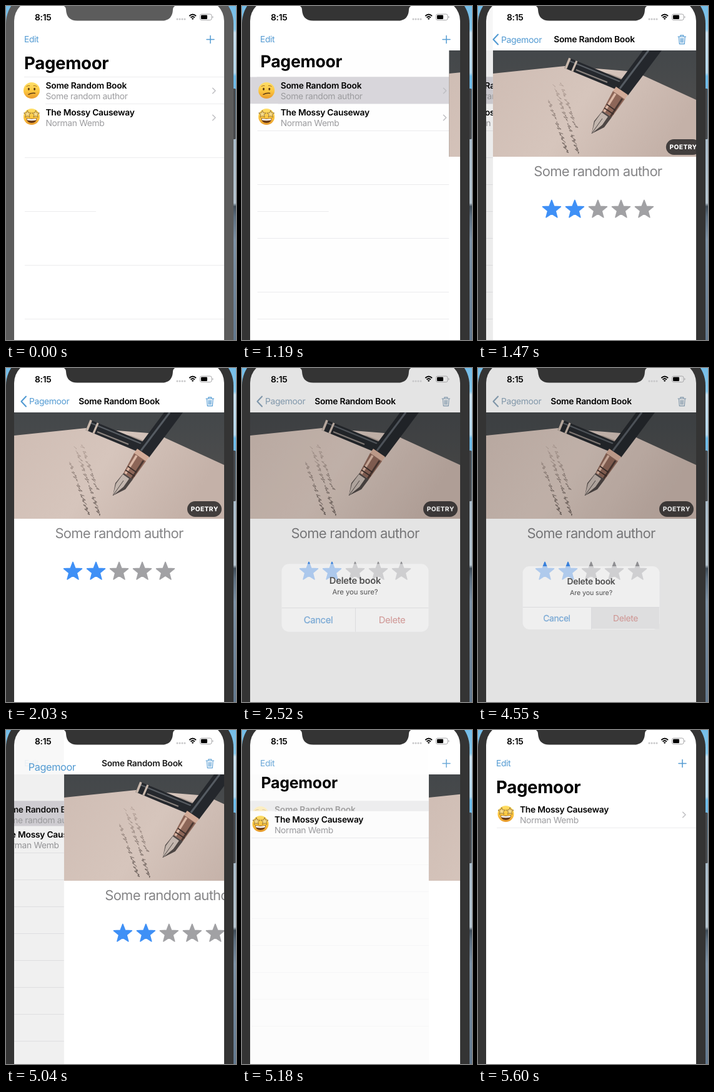
These frames come from a looping animation (368 by 534 pixels, 5810 ms). An HTML page:

```html
<!DOCTYPE html>
<html lang="en">
<head>
<meta charset="utf-8">
<title>Book list</title>
<style>
html, body { margin: 0; width: 100%; height: 100%; overflow: hidden; background: #333; }
svg { display: block; width: 100%; height: 100%; font-family: Inter, "Noto Sans", sans-serif; text-rendering: geometricPrecision; }
.body { font-size: 13.8px; letter-spacing: -.33px; }
.head { font-size: 13.8px; font-weight: 600; letter-spacing: -.24px; }
.large { font-size: 27.6px; font-weight: 700; letter-spacing: -.3px; }
.author { font-size: 22px; letter-spacing: -.74px; fill: #858587; }
.small { font-size: 10.6px; letter-spacing: -.05px; }
.badge { font-size: 10.2px; font-weight: 800; letter-spacing: .4px; fill: #fff; }
.mid { text-anchor: middle; }
.grey { fill: #9c9c9f; }
.blue { fill: #529ad2; }
.line { fill: #ececee; }
.stroke { fill: none; stroke-linecap: round; stroke-linejoin: round; }
</style>
</head>
<body>
<svg id="stage" viewBox="0 0 368 534" preserveAspectRatio="none"></svg>
<script>
const LOOP = 5810, STEP = 70, WIDTH = 336;
const ACTIVE = 980, TAP = 1050, PUSH = 1169, ALERT = 2397, PRESS = 4200, CLOSE = 4480, POP = 4987;
const APP = 'Pagemoor', BOOK = 'Some Random Book', WRITER = 'Some random author';

const text = (x, y, cls, str, extra = '') => `<text x="${x}" y="${y}" class="${cls}" ${extra}>${str}</text>`;
const rect = (x, y, w, h, extra = '') => `<rect x="${x}" y="${y}" width="${w}" height="${h}" ${extra}/>`;
const path = (d, extra = '') => `<path d="${d}" ${extra}/>`;
const group = (id, inner, extra = '') => `<g id="${id}" ${extra}>${inner}</g>`;

function star(cx, cy, r, extra) {
  const pts = Array.from({ length: 10 }, (_, i) => {
    const a = (i * 36 - 90) * Math.PI / 180, k = i % 2 ? r * .43 : r;
    return (cx + k * Math.cos(a)).toFixed(2) + ',' + (cy + k * Math.sin(a)).toFixed(2);
  });
  return `<polygon points="${pts.join(' ')}" stroke-linejoin="round" ${extra}/>`;
}

// A line of loose handwriting running upwards
function scribble(x, y, length, seed) {
  let d = `M${x} ${y}`;
  for (let s = 1; s < length; s += 1.1) {
    const gap = Math.sin(s * .33 + seed) > .8;
    const w = 2.4 * Math.sin(s * 1.7 + seed) + 1.8 * Math.sin(s * .8 + seed * 3);
    d += `${gap ? 'M' : 'L'}${(x - s * .33 + w).toFixed(1)} ${(y - s * .94 + w * .6).toFixed(1)}`;
  }
  return path(d, 'class="stroke" stroke="url(#ink)" stroke-width=".8"');
}

const face = (cy, features) =>
  `<circle cx="41" cy="${cy}" r="13" fill="url(#skin)"/><g transform="translate(41 ${cy})">${features}</g>`;

const confused = face(135, `
  <ellipse cx="-4.6" cy="-2.2" rx="1.5" ry="2.1" fill="#5b3a12"/>
  <ellipse cx="4.6" cy="-2.2" rx="1.5" ry="2.1" fill="#5b3a12"/>` +
  path('M-5 6.3Q0 3.6 5.4 4.4', 'class="stroke" stroke="#5b3a12" stroke-width="1.5"') +
  path('M-8 -6.5Q-5.5 -8.3 -3.2 -7.6M3.2 -7.6Q5.5 -8.3 8 -6.5', 'class="stroke" stroke="#a8701c" stroke-width="1"'));

const starry = face(177,
  path('M-8.4 2.2Q0 4 8.4 2.2Q7.6 10 0 10Q-7.6 10 -8.4 2.2Z', 'fill="#6a3b16"') +
  path('M-7.6 3Q0 4.6 7.6 3L7 5.6Q0 7 -7 5.6Z', 'fill="#fff"') +
  star(-6.6, -4, 6.2, 'fill="#f7dc8c" stroke="#8a6420" stroke-width=".8"') +
  star(6.6, -4, 6.2, 'fill="#f7dc8c" stroke="#8a6420" stroke-width=".8"'));

const chevron = y => path(`M330.7 ${y - 4.2}l4.3 4.2l-4.3 4.2`, 'class="stroke" stroke="#c0c0c4" stroke-width="1.6"');

const row = (id, y, bg, emoji, title, writer) => group(id,
  rect(-90, y, 560, 43, bg) +
  `<g class="lead">${emoji}${text(63.5, y + 18.6, 'head', title)}${text(63.5, y + 35, 'body grey', writer)}</g>` +
  `<g class="tail">${chevron(y + 22)}</g>`);

const lines = Array.from({ length: 8 }, (_, i) =>
  rect(30, 199 + 43 * i, 420, 1, `class="line rule"`)).join('');

const list = group('list',
  rect(-90, 71, 560, 470, 'fill="#fff"') +
  group('topLine', rect(29, 113, 420, 1, 'class="line"')) +
  row('first', 113.5, 'id="tapped" fill="#d9d7dc"', confused, BOOK, WRITER) +
  group('rest',
    row('second', 156.5, 'fill="#fff"', starry, 'The Mossy Causeway', 'Norman Wemb') +
    rect(63, 156, 380, 1, 'id="midLine" class="line"') + lines));

const cap =
  path('M131 91L223 129', 'stroke="#25282d" stroke-width="18"') +
  path('M136 88L224 124', 'stroke="#585d63" stroke-width="2"') +
  path('M131 91L134.5 92.4M142 95.5L145 96.8', 'stroke="#c9b9ad" stroke-width="18"') +
  path('M146 102L196 122', 'stroke="#8d8580" stroke-width="2"');

const pen =
  path('M253 71H283L229 143L209 130Z', 'fill="#24272c"') +
  path('M262 71L216 132', 'stroke="#555b62" stroke-width="3"') +
  path('M210 129L229 142L224 149L205 136Z', 'fill="#d2ab98"') +
  path('M205 136L224 149L203 178L188 168Z', 'fill="#8d6658"') +
  path('M209 140L191 169', 'stroke="#dcb8a6" stroke-width="3.5"') +
  path('M220 148L201 177', 'stroke="#4b3832" stroke-width="3"') +
  path('M195 157L209 167M191 163L206 173', 'stroke="#3a2d2a" stroke-width="1.6"') +
  path('M188 168L203 178L191 194L171 204L175 184Z', 'fill="#4d4644"') +
  path('M187 170L197 177L188 190L171 204L176 185Z', 'fill="#c3b6ae"') +
  path('M171 204L188 180', 'stroke="#4d4644" stroke-width="1"');

const photo = `<g clip-path="url(#frame)">` +
  rect(13, 71, 336, 170, 'fill="url(#table)"') +
  path('M13 108L128 96L240 105L349 155V241H13Z', 'fill="url(#paper)"') +
  path('M136 101L222 139L236 122L200 108Z', 'fill="#5b4d48" opacity=".3"') +
  scribble(133, 237, 92, 1) + scribble(150, 236, 116, 2.4) + scribble(146, 194, 76, 4) +
  cap + pen + '</g>';

const detail = group('detail',
  rect(13, 71, 336, 470, 'fill="#fff"') + photo +
  rect(290, 213, 55, 25, 'rx="12.5" fill="#383635" opacity=".93"') +
  text(317.7, 228.8, 'badge mid', 'POETRY') +
  text(181, 271.6, 'author mid', WRITER) +
  [0, 1, 2, 3, 4].map(i => star(107 + 37 * i, 325.6, 15.2, i < 2
    ? 'fill="#3f90f6" stroke="#3f90f6" stroke-width="1.6"'
    : 'fill="#a1a1a4" stroke="#a1a1a4" stroke-width="1.6"')).join(''));

const nav =
  rect(13, -10, 336, 81, 'fill="#fff"') +
  rect(13, -10, 336, 81, 'id="navShade"') +
  group('edit', text(29, 58.2, 'body blue', 'Edit')) +
  group('plus', path('M321 53.5H333M327 47.5V59.5', 'class="stroke" stroke="#529ad2" stroke-width="1.5"')) +
  group('arrow', path('M32 45.5L24.5 53.5L32 61.5', 'class="stroke tint" stroke-width="2.1"')) +
  group('title', text(181, 58.2, 'head mid', BOOK)) +
  group('trash', path('M320 49H332.6M323.8 49V46.8H328.8V49M321.4 49L322.3 60.6H330.3L331.2 49M324.3 51.6L324.5 58.2M326.3 51.6V58.2M328.3 51.6L328.1 58.2',
    'class="stroke tint" stroke-width="1.15"'));

const morph =
  group('back', text(0, 0, 'body', APP)) + group('large', text(0, 0, 'large', APP));

const alertBox = group('alert',
  rect(71.5, 317, 219, 101, 'rx="11" fill="#f6f6f7" fill-opacity=".96"') +
  rect(182, 383, 108, 34, 'id="press" fill="#dcdcde"') +
  text(181, 346.3, 'head mid', 'Delete book') +
  text(181, 362.6, 'small mid', 'Are you sure?') +
  rect(71.5, 382, 219, 1, 'fill="#d8d8da"') + rect(181, 382, 1, 36, 'fill="#d8d8da"') +
  text(126, 405.2, 'body mid', 'Cancel', 'fill="#3f88cc" stroke="#3f88cc" stroke-width=".25"') +
  text(236, 405.2, 'body mid', 'Delete', 'fill="#c46a66"'));

const status =
  text(46, 22.6, 'head', '8:15') +
  [0, 1, 2, 3].map(i => `<circle cx="${274 + 4 * i}" cy="21" r="1.5" fill="#c6c6c8"/>`).join('') +
  path('M293.3 16Q298.7 11.2 304.1 16M295.5 18.4Q298.7 15.7 301.9 18.4', 'class="stroke" stroke="#000" stroke-width="1.9" style="stroke-linecap:butt"') +
  path('M296.8 19.9Q298.7 18.4 300.6 19.9L298.7 22Z') +
  rect(310.5, 13, 18.5, 9.6, 'rx="2.6" fill="none" stroke="#a5a5a7"') +
  rect(312, 14.5, 10, 6.6, 'rx="1.3"') +
  path('M330.3 16V19.6Q331.6 19 331.6 17.8Q331.6 16.6 330.3 16Z', 'fill="#a5a5a7"');

const fade = (id, stops, extra = 'x2="0" y2="1"') =>
  `<linearGradient id="${id}" ${extra}>` + stops.map(([o, c]) => `<stop offset="${o}" stop-color="${c}"/>`).join('') + '</linearGradient>';

const $ = id => document.getElementById(id);
$('stage').innerHTML = `<defs>` +
  fade('skin', [[0, '#ffe06a'], [.55, '#fcc63f'], [1, '#e99a2c']]) +
  fade('table', [[0, '#43474a'], [1, '#55524f']]) +
  fade('paper', [[0, '#cfbdb4'], [.5, '#d6c5bc'], [1, '#c4b1a8']], 'x2="1" y2=".3"') +
  fade('ink', [[0, '#b5a299'], [.5, '#85756e'], [1, '#4a403c']], 'gradientUnits="userSpaceOnUse" x1="0" x2="0" y1="120" y2="225"') +
  fade('sky', [[0, '#74bde8'], [.07, '#86c8ec'], [.08, '#c9e0ee'], [.2, '#b4d7ec'], [.21, '#6cbdec'], [.25, '#70b8e4'],
    [.4, '#a9bccb'], [.59, '#b4c3ce'], [.6, '#3f4c58'], [.63, '#5d6f80'], [.7, '#7d92a6'], [1, '#62788e']]) +
  `<clipPath id="screen">${rect(13, -10, 336, 640, 'rx="34"')}</clipPath>
  <clipPath id="frame">${rect(13, 71, 336, 170)}</clipPath></defs>` +
  rect(0, 0, 368, 534, 'fill="url(#sky)"') +
  rect(360, 132, 7.5, 81, 'rx="1.5" fill="#45474a"') +
  rect(0, -24, 364, 640, 'rx="52" class="bezel"') +
  `<g clip-path="url(#screen)">` + list + rect(13, 71, 336, 470, 'id="shade"') + detail + nav + morph +
  rect(13, -10, 336, 560, 'id="dim"') + alertBox +
  group('status', status) +
  path('M86 -2Q96 -1 96 6Q97 23.6 114 23.6H249Q266 23.6 267 6Q267 -1 277 -2Z', 'class="bezel"') + '</g>';

const all = sel => [...document.querySelectorAll(sel)];
const bezels = all('.bezel'), tints = all('.tint'), rules = all('.rule'), leads = all('.lead'), tails = all('.tail');
const clamp = v => Math.max(0, Math.min(1, v));
const mix = (a, b, k) => a + (b - a) * k;
const move = (el, x, y = 0, s = 1) => el.setAttribute('transform', `translate(${x} ${y}) scale(${s})`);
const show = (id, v) => $(id).setAttribute('opacity', v);

// Critically damped spring, settled once it is close enough
function spring(ms) {
  if (ms <= 0) return 0;
  const x = ms * .0175, p = 1 - (1 + x) * Math.exp(-x);
  return p > .996 ? 1 : p;
}
const smooth = v => { v = clamp(v); return v * v * (3 - 2 * v); };

function draw(t) {
  const open = t < POP ? spring(t - PUSH) : 1 - spring(t - POP);
  const gone = smooth((t - POP) / 330);
  const pushed = t >= PUSH;

  bezels.forEach(el => el.setAttribute('fill', t < ACTIVE ? '#5c5c5c' : '#343434'));

  // List
  move($('list'), -100 * open);
  leads.forEach(el => move(el, pushed ? 3.5 : 0));
  tails.forEach(el => move(el, pushed ? -3 : 0));
  show('tapped', t >= TAP ? 1 : 0);
  show('first', 1 - gone);
  show('topLine', 1 - gone);
  show('midLine', 1 - gone);
  move($('rest'), 0, -43 * gone);
  rules.forEach((el, i) => {
    const early = t < 1260;
    const on = i % 2 ? t < ACTIVE || !early || i === 3 || i === 7 : t >= ACTIVE;
    el.setAttribute('opacity', on ? (i ? 1 - gone : 1) : 0);
    if (i === 3) el.setAttribute('width', early ? 114 : 420);
  });
  show('shade', .078 * open);

  // Detail and navigation bar
  const away = WIDTH * (1 - open);
  move($('detail'), away);
  move($('title'), away * .46);
  $('navShade').setAttribute('width', away);
  show('navShade', .035 * open);
  show('title', clamp(open * 1.5 - .25));
  show('trash', clamp(open * 1.5 - .25));
  show('edit', clamp(1.06 - open * 1.28));
  show('plus', clamp(1.06 - open * 1.4));
  show('arrow', clamp((open - .78) * 6));

  const k = Math.pow(1 - open, 1.25);
  const x = mix(37, 29, k), y = mix(58.2, 100.6, k), size = mix(1, 2.09, k);
  const bold = clamp((k - .35) / .35);
  move($('back'), x, y, size);
  move($('large'), x, y, size / 2.09);
  show('back', 1 - bold);
  show('large', bold);

  // Alert
  const shown = spring(t - ALERT), hidden = spring(t - CLOSE), a = shown * (1 - hidden);
  const c = [[82, 176], [154, 176], [210, 178]].map(([from, to]) => Math.round(mix(from, to, a)));
  const tint = `rgb(${c})`;
  tints.forEach(el => el.setAttribute('stroke', tint));
  $('back').setAttribute('fill', tint);
  show('dim', .165 * a);
  show('alert', a);
  const s = 1.2 - .2 * shown;
  move($('alert'), 181 * (1 - s), 367.5 * (1 - s), s);
  show('press', t >= PRESS ? 1 : 0);
}

const start = performance.now();
function tick() {
  const t = (performance.now() - start) % LOOP;
  draw(Math.floor(t / STEP) * STEP);
  requestAnimationFrame(tick);
}
tick();
</script>
</body>
</html>
```
